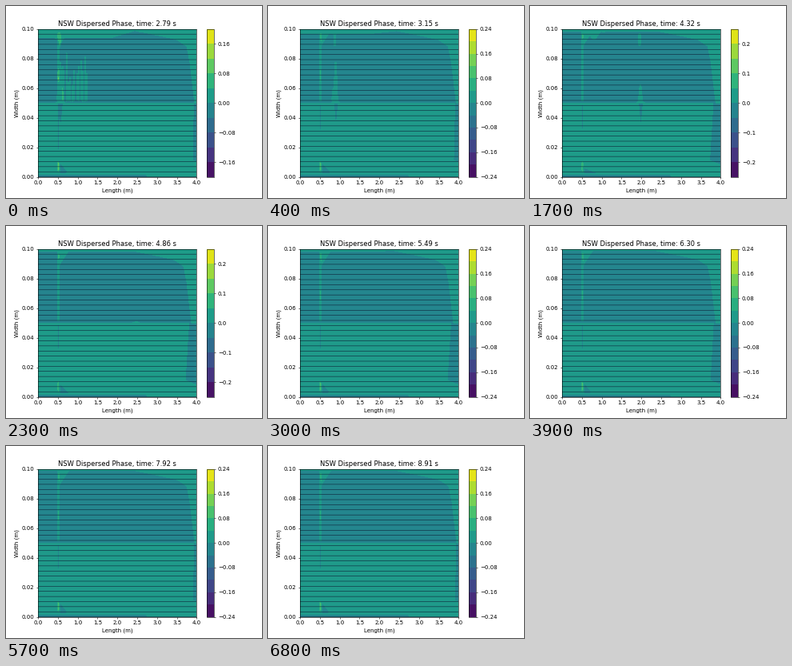
A matplotlib script for the animation above (6.9 s loop, 320x240 px).

```python
import numpy as np
import matplotlib.pyplot as plt
from matplotlib.animation import FuncAnimation

FRAMES, STEP = 69, 100
LEFT, RIGHT, TOP, BOTTOM = 40, 238.4, 28.8, 213.6
MID = 121.2     # interface between the phases
INLET = 65.5

# Stage coordinates of the sampled field, in pixels
px, py = np.meshgrid(np.linspace(LEFT, RIGHT, 398), np.linspace(BOTTOM, TOP, 371))
length = (px - LEFT) / (RIGHT - LEFT) * 4
width = (BOTTOM - py) / (BOTTOM - TOP) * 0.1
rows = np.linspace(0, 0.1, 30)

rng = np.random.default_rng(4)
STREAKS = [(x + rng.uniform(-0.8, 0.8), rng.uniform(48, 98), rng.uniform(0.4, 1))
           for x in np.arange(70, 102, 2.6)]


def bump(i, peak, spread, power=2):
    return np.exp(-abs((i - peak) / spread) ** power)


def streak(x, y0, y1, w, amp):
    """Narrow vertical jet with tapered ends."""
    ends = np.clip(np.minimum(py - y0, y1 - py) / 4, 0, 1)
    return amp * ends * bump(px, x, w)


def wedge(x, tip, amp):
    """Spike on the interface, narrowing towards its tip."""
    t = (py - tip) / (MID - tip)
    inside = (t > 0) & (t < 1)
    return amp * inside * bump(px, x, 0.8 + 3 * np.clip(t, 0, 1))


def phase(i):
    """Regions of slow flow: positive inside, in pixels from the edge."""
    sway = 2 + 8 * bump(i, 27, 20, 4)
    reach = 76 + 24 * bump(i, 14, 6)
    rough = np.exp(-i / 4)

    # Upper phase: dome with a notch and wake behind the inlet
    dome = 31 + 9 * rough * np.clip((160 - px) / 30, 0, 1)
    notch = 48 - 1.5 * np.maximum(px - 67, 0) - 6 * np.maximum(67 - px, 0)
    depth = 15 * bump(i, 8, 5) + 5 * bump(i, 17, 5) * (1 + np.sin(px / 3))
    wake = 31 + depth * np.clip((reach - px) / 4, 0, 1) * (px > INLET)
    crest = np.maximum.reduce([dome, notch, wake])
    side = np.interp(py, [31, 36, 42, 50, 70, 121], [163, 188, 215, 227, 231, 237])
    upper = np.minimum.reduce([py - crest, side - sway / 2 - px, MID - py])

    # Outlet strip, floor layer and patch beside the bottom inlet
    edge = px - 236 + sway * (0.75 + 0.45 * (py - MID) / 72)
    lower = np.minimum.reduce([edge, py - MID, 193 + edge * 0.4 - py])
    floor = np.minimum(py - 211, 176 - px)
    start = 195 + 7 * bump(i, 17, 5)
    slope = start + (px - 67) * 11 / (reach - 67)
    patch = np.minimum.reduce([px - 67, reach - px, 209 - py, py - slope])
    return np.maximum.reduce([upper, lower, floor, patch])


def field(i):
    z = np.clip(-0.012 * phase(i), -0.02, 0.02)

    # Steady inlet jet
    z += streak(INLET, 32, 121, 1.5, 0.034)
    z += streak(INLET, 78, 96, 0.6, 0.03)
    z += streak(INLET, 121, 156, 1.4, -0.034)
    z += streak(INLET, 193, 208, 0.6, 0.075)

    # Start-up turbulence
    rough = max(0, 1 - i / 6)
    for x, y0, a in STREAKS:
        z += streak(x, y0, 121, 0.7, 0.05 * a * rough)
    z += streak(INLET, 150, 182, 1.6, -0.03 * rough)
    z += streak(INLET, 76, 96, 0.6, 0.03 * rough)

    # Pulse travelling downstream
    x = 68 + 4.12 * i
    fade = np.clip((28 - i) / 10, 0, 1)
    tip = 70 + 28 * np.clip((i - 9) / 8, 0, 1)
    z += wedge(x, tip, 0.036 * fade)
    z += wedge(x + 0.5, 146, -0.036 * fade)
    z += streak(x - 1, 32, 52, 1.6, 0.036 * fade)
    return z


def levels(i):
    n, step = 6, 0.04
    if i < 4:
        n = 5
    elif 16 <= i < 24:
        n, step = 5, 0.05
    return np.arange(2 * n + 1) * step - n * step


fig = plt.figure(figsize=(6.4, 4.8), dpi=50)


def draw(i):
    fig.clear()
    ax = fig.add_subplot()
    bands = ax.contourf(length, width, field(i), levels=levels(i))
    fig.colorbar(bands, ax=ax)
    ax.hlines(rows, 0, 4, color="#0c1830", lw=0.75, snap=False)
    ax.set(xlim=(0, 4), ylim=(0, 0.1), xlabel="Length (m)", ylabel="Width (m)",
           title=f"NSW Dispersed Phase, time: {2.79 + 0.09 * i:.2f} s")
    return []


anim = FuncAnimation(fig, draw, frames=FRAMES, interval=STEP,
                     init_func=lambda: [], repeat=True, repeat_delay=0)
plt.show()
```
